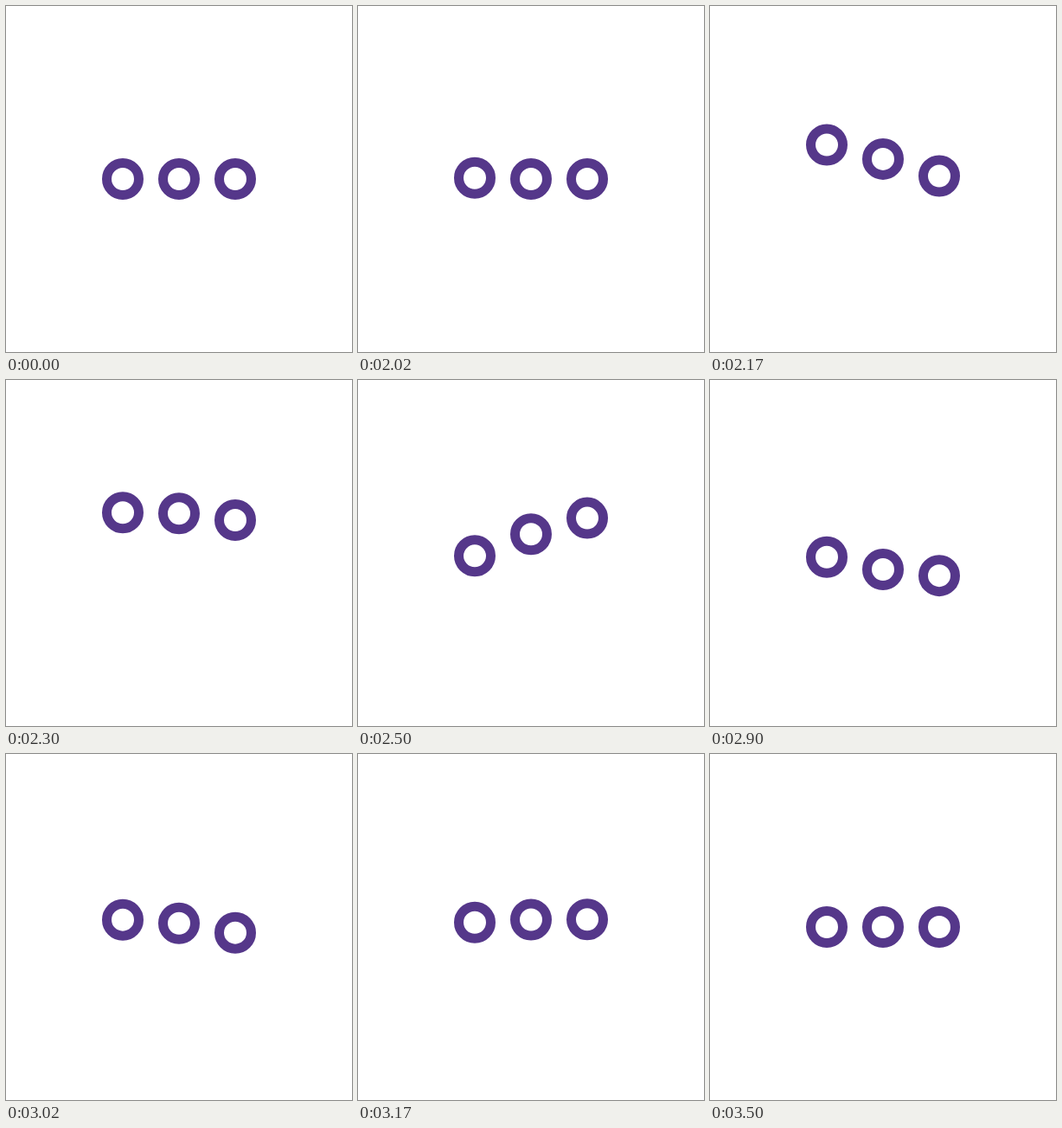
Write an HTML page that moves like this. It is 400 px wide and 400 px high and loops after 3520 ms.

```html
<!DOCTYPE html>
<html lang="en">
<head>
<meta charset="utf-8">
<title>Three bouncing rings</title>
<style>
  html, body { margin: 0; width: 100%; height: 100%; overflow: hidden; background: #fff; }
  svg { display: block; width: 100vw; height: 100vh; }
  circle { fill: none; stroke: #55378a; stroke-width: 11; }
</style>
</head>
<body>
<svg viewBox="0 0 400 400">
  <circle cx="135" cy="200" r="18.5"/>
  <circle cx="200" cy="200" r="18.5"/>
  <circle cx="265" cy="200" r="18.5"/>
</svg>
<script>
const LOOP = 3520, START = 2000, STAGGER = 67, STEP = 25;
const rings = [...document.querySelectorAll('circle')];

// Each swing: end time, end offset, ease-in and ease-out handles
const swings = [
  { end: 281, y: -47, x1: 0.333, x2: 0.37 },
  { end: 691, y: 28, x1: 0.46, x2: 0.4 },
  { end: 1075, y: -9, x1: 0.57, x2: 0.4 },
  { end: 1385, y: 0, x1: 0.25, x2: 0.4 }
];

// Cubic bezier (x1, 0, x2, 1), solved by bisection
function ease(u, x1, x2) {
  let lo = 0, hi = 1, s = 0.5;
  for (let i = 0; i < 24; i++) {
    s = (lo + hi) / 2;
    const r = 1 - s;
    const x = 3 * r * r * s * x1 + 3 * r * s * s * x2 + s * s * s;
    if (x < u) lo = s; else hi = s;
  }
  return s * s * (3 - 2 * s);
}

function offset(t) {
  if (t <= 0) return 0;
  let from = 0, y = 0;
  for (const w of swings) {
    if (t < w.end) {
      return y + (w.y - y) * ease((t - from) / (w.end - from), w.x1, w.x2);
    }
    from = w.end;
    y = w.y;
  }
  return 0;
}

function draw(ms) {
  const t = Math.floor((ms % LOOP + 5) / STEP) * STEP - START;
  rings.forEach((ring, i) => {
    ring.setAttribute('cy', (200 + offset(t - i * STAGGER)).toFixed(2));
  });
}

let begin = null;
function tick(now) {
  if (begin === null) begin = now;
  draw(now - begin);
  requestAnimationFrame(tick);
}
draw(0);
requestAnimationFrame(tick);
</script>
</body>
</html>
```
